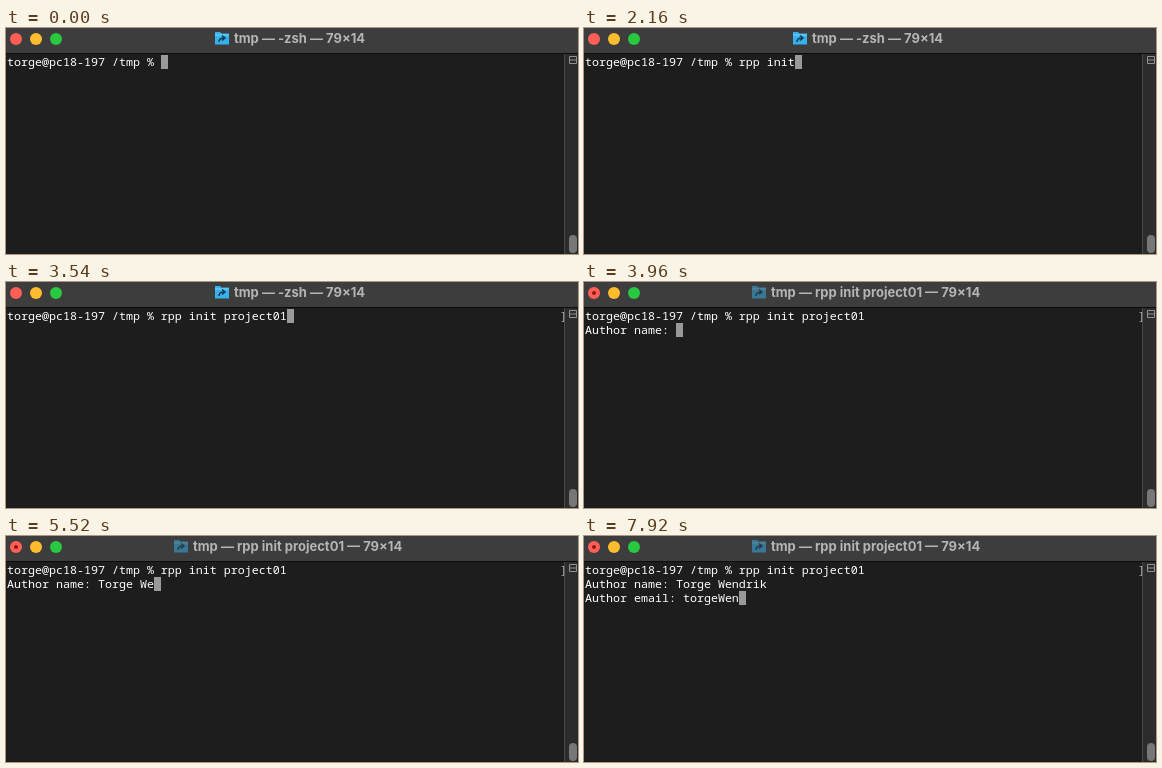
An HTML page for the animation above (8000 ms loop, 572 by 226 pixels).

```html
<!DOCTYPE html>
<html lang="en">
<head>
<meta charset="utf-8">
<title>Terminal session</title>
<style>
  html, body { margin: 0; width: 100%; height: 100%; overflow: hidden; background: #1d1d1d; }
  svg { display: block; }
  text { white-space: pre; }
  .title { font: 700 13px Inter, "Liberation Sans", sans-serif; fill: #b5b5b5; }
  /* 0.6 em advance gives 7px cells */
  .term { font: 500 11.667px "Noto Sans Mono", "DejaVu Sans Mono", monospace; fill: #fff; }
</style>
</head>
<body>
<svg width="572" height="226" viewBox="0 0 572 226">
  <rect width="572" height="226" fill="#1d1d1d"/>
  <rect width="572" height="25" fill="#3d3d3d"/>
  <rect y="25" width="572" height="1" fill="#0c0c0c"/>

  <circle cx="10" cy="11" r="6" fill="#ff5f57"/>
  <circle id="dot" cx="10" cy="11" r="2" fill="#8c1a12"/>
  <circle cx="30" cy="11" r="6" fill="#febc2e"/>
  <circle cx="50" cy="11" r="6" fill="#28c840"/>

  <g id="icon">
    <path d="M0 1h5l1.500 1.500H14V13.500H0z" fill="#35b2ec"/>
    <path d="M0 4h14" stroke="#7dd3f8"/>
    <path d="M4 11C4 8 6 7 9 7M7 4.500L10 7L7 9.500" fill="none" stroke="#123a50" stroke-width="1.500"/>
  </g>
  <text id="title" class="title" y="15"></text>

  <rect x="558" y="26" width="14" height="200" fill="#2c2c2c"/>
  <rect x="558" y="26" width="1" height="200" fill="#474747"/>
  <path d="M563.500 28.500h7v7h-7zM563 32h8" fill="none" stroke="#929292"/>
  <rect x="563" y="207" width="8" height="18" rx="4" fill="#777"/>

  <rect id="cursor" width="7" height="14" fill="#999"/>
  <g id="lines" class="term"></g>
  <text id="mark" class="term" x="554" y="38" style="fill:#a8a8a8">]</text>
</svg>
<script>
const LOOP = 8000, CELL = 7, ROW = 14;
const MARK = 3540, RUN = 3900;

// Each row: when the cursor arrives, when the prompt shows, and a time per typed key
const rows = [
  { from: 0, show: 0, prompt: "torge@pc18-197 /tmp % ", typed: "rpp init project01",
    keys: [1080, 1200, 1320, 1440, 1800, 1860, 2040, 2160, 2280,
           2400, 2520, 2640, 2700, 2820, 3060, 3180, 3300, 3420] },
  { from: 3840, show: 3960, prompt: "Author name: ", typed: "Torge Wendrik",
    keys: [4620, 4740, 4800, 4980, 5100, 5160, 5340, 5520, 5580, 5760, 5880, 6060, 6120] },
  { from: 6420, show: 6480, prompt: "Author email: ", typed: "torgeWen",
    keys: [6900, 7020, 7140, 7260, 7380, 7560, 7800, 7920] }
];

const $ = id => document.getElementById(id);
const put = (el, x, y) => { el.setAttribute("x", x); el.setAttribute("y", y); };
const show = (el, on) => el.setAttribute("visibility", on ? "visible" : "hidden");

rows.forEach((row, i) => {
  row.el = document.createElementNS("http://www.w3.org/2000/svg", "text");
  put(row.el, 1, 38 + i * ROW);
  $("lines").append(row.el);
});

function draw(t) {
  rows.forEach((row, i) => {
    const count = row.keys.filter(k => k <= t).length;
    const text = t >= row.show ? row.prompt + row.typed.slice(0, count) : "";
    row.el.textContent = text;
    if (t >= row.from) put($("cursor"), 1 + text.length * CELL, 27 + i * ROW);
  });
  const busy = t >= RUN;
  $("title").textContent = `tmp — ${busy ? "rpp init project01" : "-zsh"} — 79×14`;
  $("title").setAttribute("x", busy ? 187 : 228);
  $("icon").setAttribute("transform", `translate(${busy ? 168 : 209} 3)`);
  $("icon").setAttribute("opacity", busy ? 0.5 : 1);
  show($("dot"), busy);
  show($("mark"), t >= MARK);
}

const start = performance.now();
function tick() {
  draw((performance.now() - start) % LOOP);
  requestAnimationFrame(tick);
}
tick();
</script>
</body>
</html>
```
